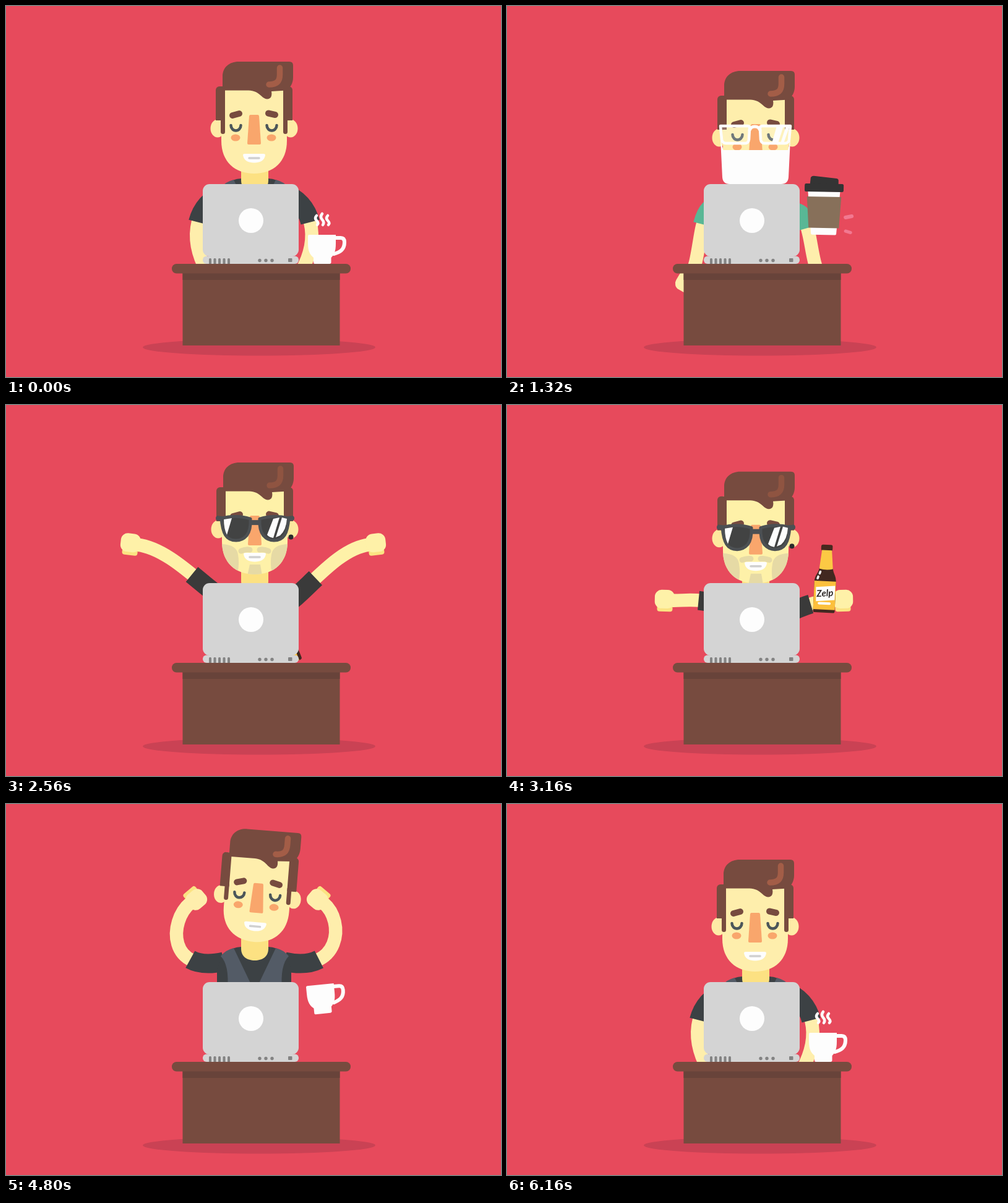
An HTML page with a canvas for the animation above (6.2 s loop, 800 by 600 pixels).

```html
<!DOCTYPE html>
<html>
<head>
<meta charset="utf-8">
<style>
html, body { margin: 0; width: 100%; height: 100%; overflow: hidden; background: #e74a5c }
canvas { display: block }
</style>
</head>
<body>
<canvas id="stage" width="800" height="600"></canvas>
<script>
const c = document.getElementById('stage').getContext('2d');
const LOOP = 6200, DUCK = 280, DEEP = 200;
const BROWN = '#774b3f', ORANGE = '#f9a66c', WHITE = '#fdfdfd';

// ---------- drawing helpers ----------
function fill(d, color) {
  c.fillStyle = color;
  c.fill(new Path2D(d));
}
function line(d, color, width, cap = 'round') {
  c.strokeStyle = color;
  c.lineWidth = width;
  c.lineCap = cap;
  c.lineJoin = 'round';
  c.stroke(new Path2D(d));
}
function box(x, y, w, h, r, color) {
  c.fillStyle = color;
  c.beginPath();
  c.roundRect(x, y, w, h, r);
  c.fill();
}
function oval(x, y, rx, ry, color) {
  c.fillStyle = color;
  c.beginPath();
  c.ellipse(x, y, rx, ry, 0, 0, 7);
  c.fill();
}
function group(draw) {
  c.save();
  draw();
  c.restore();
}
// Draws once as is and once mirrored about the line x = axis.
function both(axis, draw) {
  draw(false);
  group(() => {
    c.translate(2 * axis, 0);
    c.scale(-1, 1);
    draw(true);
  });
}

// ---------- timing helpers ----------
const clamp = v => Math.max(0, Math.min(1, v));
const mix = (a, b, u) => Array.isArray(a) ? a.map((v, i) => mix(v, b[i], u)) : a + (b - a) * u;
function keyed(keys, p) {
  if (p <= keys[0][0]) return keys[0][1];
  for (let i = 1; i < keys.length; i++) {
    const [p0, a] = keys[i - 1], [p1, b] = keys[i];
    if (p < p1) return mix(a, b, (1 - Math.cos(Math.PI * (p - p0) / (p1 - p0))) / 2);
  }
  return keys[keys.length - 1][1];
}

// ---------- poses: upper control, lower control, wrist, cuff position, shift of the right arm ----------
const rest = [310, 318, 292, 370, 325, 430, .5, 0];
const ducked = [310, 318, 296, 450, 292, 490, .5, 0];
const wide = [318, 283, 265, 232, 212, 226, .42, -3];
const raised = [322, 285, 268, 232, 235, 192, .43, -8];
const bent = [262, 323, 262, 190, 298, 160, .27, 9];
const dangle = [305, 284, 318, 400, 296, 438, .45, 0];
const swing = top => [[DUCK, ducked], [560, wide], [760, top], [1000, top], [1320, dangle], [1700, rest]];

// shoulders: how much lower the left and the right one sit
const people = [
  {
    skin: '#feeeac', ear: '#feeba6', shirt: '#3c4144', shine: '#a35d47', x: 0, shoulders: [0, 0], arms: swing(bent),
    lift: [[DUCK, DEEP], [690, -57], [880, -48], [1320, -14], [1520, 8], [1850, -3], [2150, 0]],
    tilt: [[DUCK, 0], [700, -.05], [880, .08], [1120, -.04], [1320, 0]],
    face: vestFace, item: mug
  },
  {
    skin: '#feeeac', ear: '#fee89e', shirt: '#59b795', shine: '#a35d47', x: 1, shoulders: [8, 18], arms: swing(raised),
    lift: [[DUCK, DEEP], [680, -11], [760, -5], [1000, -9], [1300, 15], [1340, 15], [1700, 0]],
    tilt: [[0, 0]],
    face: beardFace, item: paperCup
  },
  {
    skin: '#fef1a8', ear: '#fee89e', shirt: '#3a3a3a', shine: '#8f5441', x: 1, shoulders: [8, 18], arms: swing(raised),
    lift: [[DUCK, DEEP], [610, -8], [1000, -6], [1200, 20], [1600, 3]],
    tilt: [[0, 0]],
    face: shadesFace, item: bottle
  }
];
const starts = [0, 2000, 3920];
const toss = [[480, [-95, 62, -2]], [560, [-90, 55, -1.95]], [760, [-53, -13, -1.92]],
  [880, [-1, -78, -.1]], [1060, [0, -98, .06]], [1320, [0, -47, .02]], [1420, [0, 0, 0]],
  [1500, [0, -6, 0]], [1580, [0, 0, 0]]];
const beardLag = [[DUCK, 0], [760, -9], [1000, -9], [1320, 0]];

// ---------- body ----------
function arm(pose, dy, who, right) {
  const [ax, ay, bx, by, hx, hy, cuff, shift] = pose;
  const s = right ? -shift : 0, low = dy + who.shoulders[+right];
  const pts = [[352, 303 + low], [ax, ay + low], [bx + s, by], [hx + s, hy]];
  const curve = q => `M${q[0]} C${q[1]} ${q[2]} ${q[3]}`;
  line(curve(pts), who.skin, 21.5, 'butt');
  group(() => {
    c.translate(...pts[3]);
    c.rotate(Math.atan2(pts[3][1] - pts[2][1], pts[3][0] - pts[2][0]));
    box(-2, -18, 25, 10, 4, '#fbe382');
    box(-5, -13, 32, 30, 11, who.skin);
  });
  // sleeve: the part of the curve up to the cuff
  const sleeve = [];
  for (let q = pts; q.length; q = q.slice(1).map((v, i) => mix(q[i], v, cuff))) sleeve.push(q[0]);
  line(curve(sleeve), who.shirt, 31, 'butt');
}

function torso(who) {
  group(() => {
    c.translate(0, who.shoulders[0]);
    fill('M341 340 V315 L352 290 Q367 279 380 279 H424 Q437 279 452 290 L461 315 V340Z', who.shirt);
  });
  box(341, 335, 120, 13, 0, who.shirt);
  if (who === people[0]) both(402, () =>
    fill('M368 281 Q355 284 347 294 Q361 308 358 348 H400 Z', '#535b66'));
  fill('M380 250 H424 V282 C424 295 414 301 402 301 S380 295 380 282Z', '#fce182');
}

// ---------- heads ----------
const FACE = 'M348 130 H454 V218 C454 252 432 271 401 271 S348 252 348 218Z';

function eyes() {
  line('M363.500 193 a8 8.500 0 0 0 16 0 M421.500 193 a8 8.500 0 0 0 16 0', '#4b565a', 4.5);
}
function cheeks() {
  both(400, () => oval(371, 213, 7.5, 5.5, ORANGE));
}
function mouth(y) {
  group(() => {
    c.translate(0, y);
    fill('M383 241 Q383 239 386 239 H416 Q419 239 419 241 C418 250 410 253.500 401 253.500 S384 250 383 241Z', WHITE);
    line('M393 246 H409', '#d0d0d0', 3.5);
  });
}
function head(who, p) {
  both(401, () => oval(342, 198, 11.5, 14.5, who.ear));
  fill(FACE, who.skin);
  line('M366 177 L377 174 M424 173.500 L435 176', BROWN, 10);
  fill('M395 176 H407 Q408.500 176 409 178 L412 222 Q412 224 410 224 H392 Q390 224 390 222 L393 178 Q393.500 176 395 176Z', ORANGE);
  both(401, () => box(339, 130, 15, 55, [6, 0, 0, 0], BROWN));
  fill('M350 136.500 V114 C350 99 361 90 376 90 H458 Q464 90 464 96 V115 C464 126 459 132 454 136.500 L429 138 Q431 150 422 150.500 C413 150 410 137 392 136.500Z', BROWN);
  line('M442.500 100 V111 C442.500 123 436 127 425 127', who.shine, 9.5);
  who.face(p);
}

function vestFace() {
  both(401, () => box(347, 180, 7, 27, [0, 0, 4, 4], BROWN));
  eyes();
  cheeks();
  mouth(0);
}

function beardFace(p) {
  eyes();
  cheeks();
  group(() => {
    c.translate(0, keyed(beardLag, p));
    fill('M344 200 L348.500 218 H453 L457 200 L454 262 Q453 273 442 273 H359 Q348 273 347 262Z', WHITE);
  });
  const lenses = 'M344 179 H388 Q392 179 391 184 L390 201 Q389 207 384 207 H353 Q347 207 346 201Z ' +
    'M457 179 H412 Q407 179 408 184 L409 201 Q410 207 415 207 H448 Q454 207 455 201Z';
  fill(lenses, 'rgba(255,255,255,.2)');
  line(lenses, WHITE, 4.5);
  line('M391 186 Q393 180 399.500 180 T408 186', WHITE, 5);
  fill('M435 179 H446 L437 207 H427Z M450 179 H456 L446 207 H441Z', WHITE);
}

function shadesFace() {
  const shade = '#e6daa5', frame = '#4c5053';
  group(() => {
    c.clip(new Path2D(FACE));
    both(401, () => {
      fill('M348 222 Q372 223 374 239 Q377 256 372 274 H348Z', shade);
      line('M379 233 Q386 230 393 231', shade, 9);
    });
    fill('M393 255 H410 L413 273 H389Z', shade);
  });
  mouth(-3);
  c.translate(0, 1);
  both(401.5, () => {
    line('M342 179 L350 180', frame, 8);
    const lens = 'M347 179 Q371 173 394 180 Q395 198 388 207 Q381 215 371 215 C355 215 349 204 347 179Z';
    fill(lens, '#424343');
    line(lens, frame, 5);
  });
  line('M393 186 H411', frame, 8, 'butt');
  fill('M351 181 L364 179 L356 206 Q351 196 351 181Z M431 180 L441 178 L431 211 Q424 210 421 206Z M445 178 L453 180 Q452 198 442 207 L435 210Z', WHITE);
  oval(459.5, 209.5, 4, 4, '#2b2b2c');
}

// ---------- things on the desk ----------
function mug(p, leaving) {
  fill('M488 372 Q488 370 490 370 H533 V384 C533 398 530 402 525.500 407 V415 Q525 417 523 417 H499 Q497 417 497 415 V407 C491 402 488 396 488 384Z', WHITE);
  line('M532 375 H541 Q547 375 547 382 C547 394 540 398 530 401', WHITE, 6);
  const a = leaving ? clamp(1 - (p - 60) / 140) : clamp((p - 1600) / 250);
  c.globalAlpha = a;
  c.translate(0, (1 - a) * 10);
  line('M502 339 q-4 4 0 8 t1 7 M511 336 q-4 5 0 9.500 t1 8.500 M520 339 q-4 4 0 8 t1 7', WHITE, 4.5);
  c.globalAlpha = 1;
}

function paperCup() {
  fill('M486 347 H538 L533 415 Q533 417 531 417 H494 Q492 417 492 415Z', WHITE);
  fill('M484.500 355.500 H540 L537 406 H488Z', '#87705a');
  fill('M489 336 L490 325 Q491 322 495 322 L532 325.500 Q535 326 535 329 V336Z', '#343434');
  box(480.5, 334.5, 63, 13, 2.5, '#343434');
}

function bottle() {
  box(505.5, 307, 18.5, 10, 3, '#48291f');
  fill('M504 345 H526 C527 354 532 356 532 368 V414 Q532 417 529 417 H500 Q497 417 497 414 V368 C497 356 503 354 504 345Z', '#422820');
  fill('M507 316 H523 L526 346 Q515 349 504 346Z', '#fcc944');
  box(497, 366, 35, 46, 0, '#fcc03c');
  fill('M500 376 L531 373 V396 L501 399Z', WHITE);
  line('M506 402 H523', WHITE, 4);
  line('M506 351 L505 354 M503 359 L502 362', WHITE, 3.5);
  group(() => {
    c.translate(515, 386);
    c.rotate(-.1);
    c.font = 'italic bold 15px Lato, sans-serif';
    c.textAlign = 'center';
    c.textBaseline = 'middle';
    c.fillStyle = '#2f2a28';
    c.fillText('Zelp', 0, 0);
  });
}

function item(who, p, leaving) {
  let x, y, turn;
  if (leaving) {
    const u = clamp((p - 130) / 150) ** 2;
    [x, y, turn] = [-35 * u, 135 * u, 0];
  } else {
    if (p < 480) return;
    [x, y, turn] = keyed(toss, p);
  }
  const cy = who.item === bottle ? 362 : who.item === mug ? 393 : 369;
  group(() => {
    c.translate(512 + x, cy + y);
    c.rotate(turn);
    c.translate(-512, -cy);
    who.item(p, leaving);
  });
  // short streaks beside the falling cup
  if (who.item === paperCup && !leaving && p > 1240 && p < 1420) group(() => {
    const k = (p - 1320) / 8;
    c.translate(k, 0);
    c.globalAlpha = clamp((1420 - p) / 60);
    line('M547 342 L557 340', '#f27890', 6);
    line('M547 364 L555 366.500', '#f27890', 5);
  });
}

// ---------- furniture ----------
function furniture() {
  box(318, 288, 155, 117, 11, '#d4d4d4');
  box(318, 404.5, 155, 12.5, 6, '#d4d4d4');
  oval(396, 347, 20, 20, WHITE);
  for (let i = 0; i < 5; i++) box(328 + i * 7.5, 408, 4, 9, [1.5, 1.5, 0, 0], '#838383');
  for (let i = 0; i < 3; i++) oval(410 + i * 10, 411.5, 2.7, 2.7, '#838383');
  box(456, 408, 6.5, 6, 1, '#838383');
  box(285.5, 425, 254, 124, 0, BROWN);
  box(285.5, 432, 254, 11, 0, '#68433a');
  box(268, 417, 289, 15.5, 7.5, BROWN);
}

function draw(t) {
  let k = 2;
  while (t < starts[k]) k--;
  const p = t - starts[k], leaving = p < DUCK;
  const who = people[leaving ? k : (k + 1) % 3];
  const u = (p / DUCK) ** 2.6;
  const dy = leaving ? mix(who.lift[who.lift.length - 1][1], DEEP, u) : keyed(who.lift, p);
  const pose = leaving ? mix(rest, ducked, u) : keyed(who.arms, p);
  const tilt = leaving ? 0 : keyed(who.tilt, p);

  box(0, 0, 800, 600, 0, '#e74a5c');
  oval(409, 552, 188, 13.5, '#ca4254');
  both(401, right => arm(pose, dy, who, right));
  group(() => {
    c.translate(0, dy);
    torso(who);
    c.translate(402 + who.x, 265);
    c.rotate(tilt);
    c.translate(-402, -265);
    head(who, leaving ? 2000 : p);
  });
  item(who, p, leaving);
  furniture();
}

function frame() {
  draw(performance.now() % LOOP);
  requestAnimationFrame(frame);
}
frame();
</script>
</body>
</html>
```
